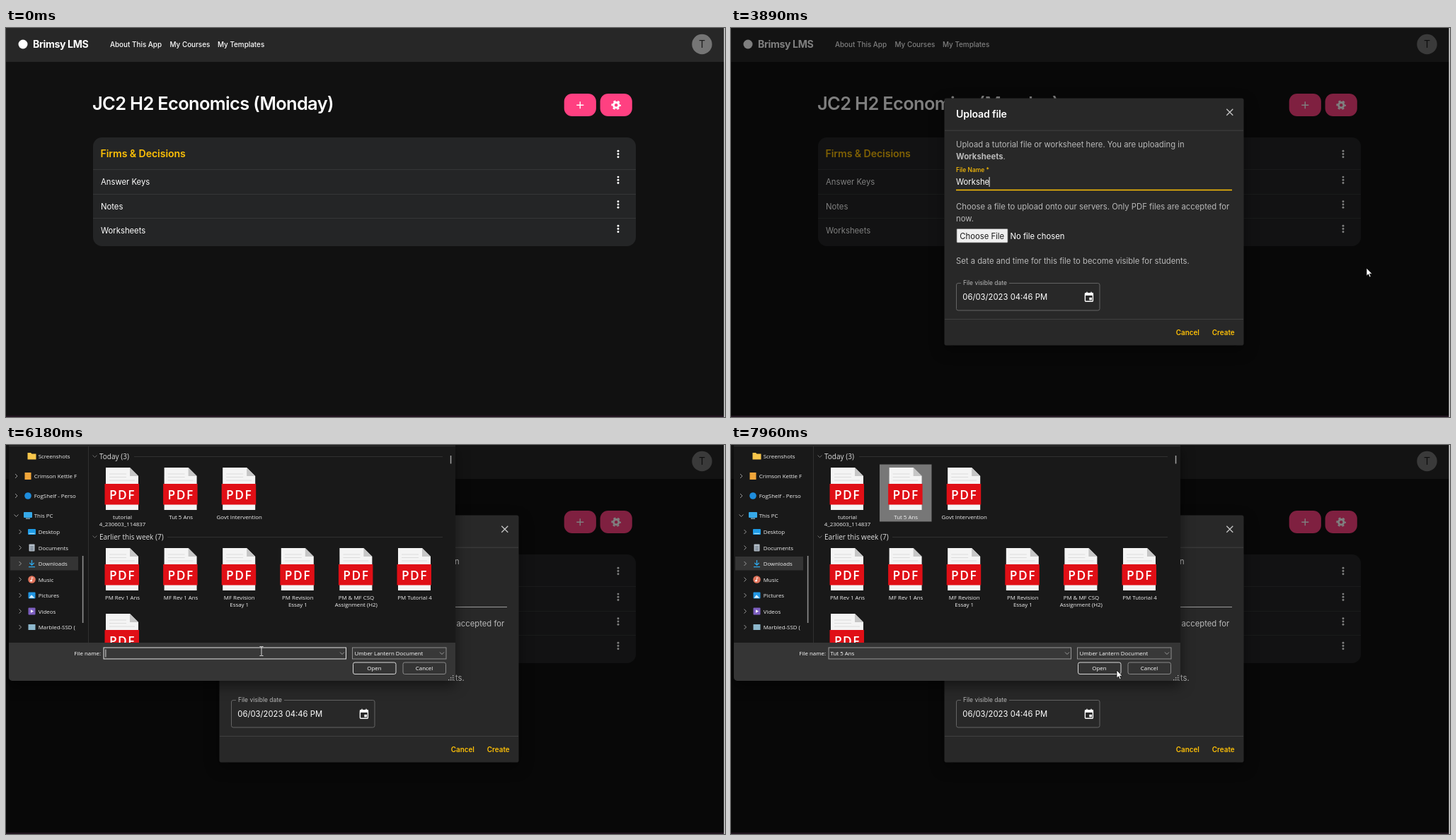
An HTML page for the animation above (8000 ms loop, 1016 px wide and 551 px high).

```html
<!DOCTYPE html>
<html lang="en">
<head>
<meta charset="utf-8">
<title>Course file upload</title>
<style>
html, body { margin: 0; width: 100%; height: 100%; overflow: hidden; background: #111; }
svg { display: block; width: 100vw; height: 100vh; }
text { font-family: Inter, sans-serif; font-optical-sizing: none; white-space: pre; }
#dialog { filter: drop-shadow(0 7px 9px rgba(0,0,0,.5)); }
#dialog text { font-family: "Open Sans", sans-serif; }
</style>
</head>
<body>
<svg id="stage" viewBox="0 0 1016 551"></svg>
<script>
const AMBER = "#ffc107", PINK = "#ff4081", SOFT = "#b9b9b9";
const stage = document.getElementById("stage");

// Markup helpers
const text = (s, x, y, size = 11.29, fill = "#fff", extra = "") =>
  `<text x="${x}" y="${y}" font-size="${size}" fill="${fill}" ${extra}>${s}</text>`;
const rect = (x, y, w, h, fill, extra = "") =>
  `<rect x="${x}" y="${y}" width="${w}" height="${h}" fill="${fill}" ${extra}/>`;
const circle = (x, y, r, fill, extra = "") =>
  `<circle cx="${x}" cy="${y}" r="${r}" fill="${fill}" ${extra}/>`;
const line = (d, color, width = 1, extra = "") =>
  `<path d="${d}" fill="none" stroke="${color}" stroke-width="${width}" ${extra}/>`;
const shape = (d, fill, extra = "") => `<path d="${d}" fill="${fill}" ${extra}/>`;
const group = (id, content) => `<g id="${id}">${content}</g>`;
const weight = (w, spacing = 0) => `font-weight="${w}" letter-spacing="${spacing}em"`;
const MIDDLE = 'text-anchor="middle"';

const dots = y => [-4.2, 0, 4.2].map(d => circle(865, y + d, 1.45, "#fff")).join("");
const plus = (x, y, r, color, w) => line(`M${x - r} ${y}h${2 * r}M${x} ${y - r}v${2 * r}`, color, w);

const page = () => `
  ${rect(0, 0, 1016, 551, "#111")}
  ${rect(0, 0, 1016, 48, "#272727")}
  ${circle(24, 23, 6.5, "#fff")}
  ${text("Brimsy LMS", 38, 28, 14.11, "#fff", weight(700, -.025))}
  ${text("About This App", 147, 27, 9.88, "#fff", weight(500))}
  ${text("My Courses", 231.5, 27, 9.88, "#fff", weight(500))}
  ${text("My Templates", 299, 27, 9.88, "#fff", weight(500))}
  ${circle(983.5, 23, 14.2, "#757575")}
  ${text("T", 983.5, 28, 14.11, "#1c1c1c", MIDDLE)}
  ${text("JC2 H2 Economics (Monday)", 122, 116, 25.4, "#fff", weight(600, -.025))}
  ${rect(788.7, 93, 45.2, 32, PINK, 'rx="11.3"')}${rect(839.6, 93, 45.2, 32, PINK, 'rx="11.3"')}
  ${plus(811.3, 109.2, 5, "#fff", 1.4)}
  ${circle(862.2, 109.2, 3.7, "none", 'stroke="#fff" stroke-width="2.8"')}
  ${circle(862.2, 109.2, 5.8, "none", 'stroke="#fff" stroke-width="2" stroke-dasharray="3.1 2.97" stroke-dashoffset="1.55"')}
  ${rect(123, 155, 767, 154, "#242526", 'rx="12.5"')}
  ${line("M123 200.5H890M123 235.5H890M123 269.5H890", "#353637")}
  ${text("Firms &amp; Decisions", 133.5, 182.5, 14.11, AMBER, weight(600, -.005))}
  ${text("Answer Keys", 134, 222)}${text("Notes", 134, 256.7)}${text("Worksheets", 134, 291.2)}
  ${circle(865, 284, 13.5, "#37383a", 'id="ripple"')}
  ${[178.5, 215.3, 250, 284.5].map(dots).join("")}`;

const menu = () => `
  ${rect(851, 304, 106, 93, "#111", 'rx="2.8"')}
  ${rect(851, 307, 106, 25.4, "#272727")}
  ${rect(851, 332.4, 106, 25.4, "#1e1e1e", 'id="createHover"')}
  ${shape("M863.5 324.2v-2.1l5.6-5.6 2.1 2.1-5.6 5.6zM869.7 316l1.1-1.1 2.1 2.1-1.1 1.1z", "#ddd")}
  ${plus(868, 345.2, 3.7, "#ddd", 1.2)}
  ${line("M851 363.5H957", "#333")}
  ${shape("M864.8 380h6.4v7h-6.4zM864.3 378h2.2l.6-.7h1.8l.6.7h2.2v1.3h-7.4z", "#d50000")}
  ${text("Edit Section", 882, 324, 11.29, "#e0e0e0")}
  ${text("Create File", 882, 349, 11.29, "#e0e0e0")}
  ${text("Delete", 882, 386.5, 11.29, "#c40000")}`;

const modal = () => `
  ${rect(0, 0, 1016, 551, "#000", 'opacity=".5"')}
  ${rect(301.5, 99.5, 423, 350, "#282828", 'rx="2.8" style="filter:drop-shadow(0 7px 10px rgba(0,0,0,.4))"')}
  ${line("M302 145.2H724M302 412.5H724", "#404040")}
  ${text("Upload file", 318, 127, 14.11, "#fff", weight(600, -.01))}
  ${line("M700.3 114.8l9 9m0-9l-9 9", "#c4c4c4", 1.3)}
  ${text("Upload a tutorial file or worksheet here. You are uploading in", 318, 169.3, 11.29, SOFT)}
  ${text("Worksheets", 318, 186.3, 11.29, SOFT, weight(700) + ' id="folderName"')}
  ${text("File Name *", 318, 204, 8.47, AMBER, weight(500) + ' id="label"')}
  ${text("", 318, 222, 11.29, "#fff", 'id="typed"')}
  ${rect(318, 211, .9, 14, "#fff", 'id="caret"')}
  ${line("M318 229.5H708", AMBER, 1.4, 'id="underline"')}
  ${text("Choose a file to upload onto our servers. Only PDF files are accepted for", 318, 257, 11.29, SOFT)}
  ${text("now.", 318, 274, 11.29, SOFT)}
  ${rect(319, 284.5, 72, 19.5, "#efefef", 'stroke="#767676" stroke-width=".7" rx="1"')}
  ${text("Choose File", 323.3, 298.5, 11.29, "#1a1a1a")}
  ${text("No file chosen", 394.5, 298.5)}
  ${text("Set a date and time for this file to become visible for students.", 318, 334.3, 11.29, SOFT)}
  ${line("M325 361.5h-4a2.5 2.5 0 0 0-2.5 2.5v33.5a2.5 2.5 0 0 0 2.5 2.5h197.5a2.5 2.5 0 0 0 2.5-2.5v-33.5a2.5 2.5 0 0 0-2.5-2.5H393", "#6b6b6b", .9)}
  ${text("File visible date", 328, 364, 8.47, SOFT)}
  ${text("06/03/2023 04:46 PM", 327.3, 384.5)}
  ${rect(500.4, 375.8, 11, 11.4, "none", 'stroke="#fff" stroke-width="1.4" rx="1"')}
  ${rect(500, 375.3, 12, 3.6, "#fff")}${rect(506.3, 381.8, 3.6, 3.6, "#fff")}
  ${line("M503 373.8v2M509 373.8v2", "#fff", 1.4)}
  ${text("Cancel", 628.7, 434.5, 9.88, AMBER, weight(600))}
  ${text("Create", 679.8, 434.5, 9.88, AMBER, weight(600))}`;

// File picker
const SMALL = 7.9;
const chevron = (x, y, down, color = "#a5a5a5") =>
  line(down ? `M${x - 3} ${y - 1.5}l3 3 3-3` : `M${x - 1.5} ${y - 3}l3 3-3 3`, color, .9);

const icons = {
  folder: (x, y) => shape(`M${x - 6} ${y - 4.5}h4.5l1.5 1.5h6v8h-12z`, "#f7c64b"),
  square: (x, y) => rect(x - 4.5, y - 5, 9, 10, "#f0a53a"),
  disc: (x, y) => circle(x, y, 4.8, "#1e8ddd"),
  screen: (x, y) => rect(x - 6, y - 5, 12, 8, "#36a9e8", 'rx="1"') + rect(x - 3, y + 3.5, 6, 1.3, "#8fb8cc"),
  desk: (x, y) => rect(x - 5.5, y - 4, 11, 8, "#1d9be6", 'rx="1"') + rect(x - 4, y + 1.8, 8, 1, "#c9ecff"),
  page: (x, y) => rect(x - 4, y - 5, 8, 10, "#b4bec8", 'rx=".7"') + line(`M${x - 2.3} ${y - 1.5}h4.6m0 2.2h-4.6m0 2.2h4.6`, "#566573", .9),
  arrow: (x, y) => line(`M${x} ${y - 5}v7m-3.2-3l3.2 3.2 3.2-3.2M${x - 4.5} ${y + 4.6}h9`, "#2ea8ea", 1.3),
  music: (x, y) => circle(x, y, 5.3, "#e0745c") + circle(x - 1, y + 1.7, 1.3, "#fff") + line(`M${x} ${y + 1.7}v-4.5l2 1`, "#fff", .8),
  photo: (x, y) => rect(x - 5, y - 4.5, 10, 9, "#2196e3", 'rx="1"') + shape(`M${x - 4} ${y + 3.7}l3.5-4.5 4.5 4.5z`, "#d8f0ff"),
  film: (x, y) => rect(x - 5, y - 5, 10, 10, "#7d5fc0", 'rx="1"') + shape(`M${x - 1.5} ${y - 2.3}l4 2.3-4 2.3z`, "#fff"),
  drive: (x, y) => rect(x - 5, y - 4, 10, 8, "#8db7cc")
};

const places = [
  ["Screenshots", 15.5, "folder", 2], ["Crimson Kettle F", 44, "square", 0], ["FogShelf - Perso", 72, "disc", 0],
  ["This PC", 100, "screen", 0], ["Desktop", 123, "desk", 1], ["Documents", 145.5, "page", 1],
  ["Downloads", 168, "arrow", 1], ["Music", 190.5, "music", 1], ["Pictures", 213, "photo", 1],
  ["Videos", 235.5, "film", 1], ["Marbled-SSD (", 258, "drive", 1]
];
const place = ([name, y, icon, depth]) =>
  (depth < 2 ? chevron(depth ? 20 : 14.5, y, name === "This PC") : "") +
  icons[icon](depth ? 36.5 : 31, y) + text(name, depth ? 45.7 : 39.7, y + 3, SMALL, "#f0f0f0");

const column = i => 164 + 82.6 * i;
const file = (lines, i, top) => {
  const x = column(i);
  return shape(`M${x - 23} ${top}h34l12 12v48h-46z`, "#f4f4f4") +
    shape(`M${x + 11} ${top}v12h12z`, "#c6c6c6") +
    line(`M${x - 18} ${top + 9}h24m-24 4.5h24m-24 4.5h36`, "#dcdcdc") +
    rect(x - 24.5, top + 23, 48.5, 29.5, "#e00f16") +
    text("PDF", x + .5, top + 44.6, 17.3, "#fff", MIDDLE + " " + weight(600, .09)) +
    lines.map((s, n) => text(s, x + .5, top + 72.5 + 10.5 * n, SMALL, "#f2f2f2", MIDDLE)).join("");
};
const today = [["tutorial", "4_230603_114837"], ["Tut 5 Ans"], ["Govt Intervention"]];
const earlier = [["PM Rev 1 Ans"], ["MF Rev 1 Ans"], ["MF Revision", "Essay 1"], ["PM Revision", "Essay 1"],
  ["PM &amp; MF CSQ", "Assignment (H2)"], ["PM Tutorial 4"]];
const heading = (s, y, lineX) => chevron(125.5, y, true, "#777") +
  text(s, 132, y + 4, 10, "#dedede") + line(`M${lineX} ${y + .5}H617`, "#303030");
const button = (s, x, border) => rect(x, 308, 60.5, 16.5, "#343434", `rx="2.5" stroke="${border}" stroke-width=".9"`) +
  text(s, x + 30, 319, SMALL, "#fff", MIDDLE);
const gripDots = [[631, 326], [628, 329], [631, 329], [625, 332], [628, 332], [631, 332]];

const dialog = () => `
  <clipPath id="sideClip"><rect width="103" height="280"/></clipPath>
  <clipPath id="listClip"><rect x="117" width="517" height="280"/></clipPath>
  ${shape("M4 0H635V329a5 5 0 0 1-5 5H9a5 5 0 0 1-5-5z", "#191919")}
  ${shape("M4 280H635V329a5 5 0 0 1-5 5H9a5 5 0 0 1-5-5z", "#353535")}
  ${line("M4 1.5H635M116.5 2V280", "#2f2f2f")}
  ${rect(6, 158, 96, 19.5, "#343434")}
  <g clip-path="url(#sideClip)">${places.map(place).join("")}</g>
  ${rect(107.8, 157, 1.6, 95, "#8e8e8e")}
  ${text("Working on it...", 376, 22.5, SMALL, "#fff", MIDDLE + ' id="working"')}
  <g id="files" clip-path="url(#listClip)">
    ${rect(117, 120, 505, 20, "#2b2b2b", 'id="headingHover"')}
    ${rect(210, 27.5, 73.5, 81, "#4d4d4d", 'id="todayHover"')}
    ${rect(210, 141, 73.5, 82, "#4d4d4d", 'id="earlierHover"')}
    ${heading("Today (3)", 16, 181)}${heading("Earlier this week (7)", 130, 228)}
    ${today.map((f, i) => file(f, i, 32)).join("")}
    ${earlier.map((f, i) => file(f, i, 146)).join("")}
    ${file([], 0, 239)}
    ${rect(627.8, 15, 1.5, 11.5, "#a0a0a0")}
  </g>
  ${text("File name:", 134, 298, SMALL, "#fff", 'text-anchor="end"')}
  ${rect(138, 287, 342.5, 16, "#383838", 'id="nameField" stroke="#e4e4e4" stroke-width="1"')}
  ${text("Tut 5 Ans", 140.5, 298, SMALL, "#fff", 'id="chosen"')}
  ${rect(140.5, 289.5, .8, 11, "#fff", 'id="nameCaret"')}
  ${chevron(475, 295, true)}
  ${rect(489.5, 287, 132.5, 16, "#383838", 'stroke="#989898" stroke-width=".9"')}
  ${text("Umber Lantern Document", 492.5, 298, SMALL, "#fff")}${chevron(616, 295, true)}
  ${button("Open", 490.5, "#ececec")}${button("Cancel", 561, "#929292")}
  ${gripDots.map(([x, y]) => rect(x, y, 1.4, 1.4, "#aaa")).join("")}`;

const cursor = () => `
  ${shape("M0 0V11.2L2.6 8.8 4.4 12.9 6.2 12.1 4.5 8.2H8z", "#fff", 'id="arrow" stroke="#000" stroke-width=".7"')}
  ${shape("M-1.4 1.3q1.4-1.8 2.8 0V6l5 1.3q1.6.5 1.5 2l-1 4.5v2.2h-6.5l-4.5-6q-.4-1.9 1.5-1.4l1.2 1z", "#fff", 'id="hand" stroke="#000" stroke-width=".7"')}
  ${line("M-2.5-6.5h2l.5.5.5-.5h2M0-6V6M-2.5 6.5h2l.5-.5.5.5h2", "#eee", .9, 'id="beam"')}`;

stage.innerHTML = page() + group("menu", menu()) + group("modal", modal()) + group("dialog", dialog()) +
  rect(0, 549, 1016, 2, "#21141f") + rect(1014.5, 0, 1.5, 551, "#d8d8d8") + group("cursor", cursor());
const el = {};
stage.querySelectorAll("[id]").forEach(node => el[node.id] = node);
el.folderName.insertAdjacentHTML("beforeend", '<tspan font-weight="400">.</tspan>');

// Timing
const LOOP = 8000, BLUR = 5400, PICK = 7400;
const FILE_NAME = "Worksheet 5";
const keyTimes = [2620, 3020, 3160, 3420, 3560, 3750, 3890, 4040, 4170, 4370, 4510];
const route = [
  [70, 971, 552], [740, 865, 285.5], [1060, 865, 285.5], [1340, 898, 340], [4680, 898, 340],
  [5440, 361, 292], [6500, 361, 292], [6640, 254, 145], [6960, 244, 78], [7340, 247, 62],
  [7430, 247, 62], [7960, 545, 319]
];
const clamp = v => Math.min(1, Math.max(0, v));
const ramp = (t, from, to) => clamp((t - from) / (to - from));
const easeOut = p => 1 - (1 - p) ** 3;
const smooth = p => p * p * (3 - 2 * p);
const show = (node, on) => node.setAttribute("visibility", on ? "inherit" : "hidden");
const blink = (t, since) => (t - since + LOOP) % 1000 < 500;

function position(t) {
  if (t < route[0][0]) return [971, 570];
  const next = route.findIndex(stop => stop[0] > t);
  if (next < 0) return route[route.length - 1].slice(1);
  const [t0, x0, y0] = route[next - 1], [t1, x1, y1] = route[next];
  const p = smooth(ramp(t, t0, t1));
  return [x0 + (x1 - x0) * p, y0 + (y1 - y0) * p];
}

function drawPage(t) {
  const opened = easeOut(ramp(t, 940, 1180)) * (1 - ramp(t, 1560, 1720));
  el.menu.setAttribute("opacity", opened);
  el.ripple.setAttribute("opacity", opened);
  show(el.createHover, t > 1310);
}

function drawModal(t) {
  el.modal.setAttribute("opacity", easeOut(ramp(t, 1660, 1960)));
  const count = keyTimes.filter(k => k <= t).length;
  el.typed.textContent = FILE_NAME.slice(0, count);
  el.caret.setAttribute("x", 318 + (count ? el.typed.getComputedTextLength() - .5 : 0));
  const focused = t < BLUR;
  show(el.caret, focused && blink(t, count ? keyTimes[count - 1] : 1790));
  el.label.setAttribute("fill", focused ? AMBER : SOFT);
  el.underline.setAttribute("stroke", focused ? AMBER : SOFT);
  el.underline.setAttribute("stroke-width", focused ? 1.4 : .8);
}

function drawDialog(t, x, y) {
  const p = ramp(t, 5680, 5900), scale = 1 - .06 * (1 - p) ** 1.2;
  const loaded = t >= 6150, picked = t >= PICK;
  show(el.dialog, t >= 5690);
  el.dialog.setAttribute("opacity", clamp(p * 1.6));
  el.dialog.setAttribute("transform", `translate(162 59) scale(${scale}) translate(-162 -59)`);
  show(el.working, !loaded);
  show(el.files, loaded);
  const inColumn = x > 210 && x < 284;
  show(el.headingHover, loaded && y > 120 && y < 140);
  show(el.earlierHover, loaded && inColumn && y > 141 && y < 223);
  show(el.todayHover, loaded && (picked || inColumn && y < 108));
  el.todayHover.setAttribute("fill", picked ? "#777" : "#4d4d4d");
  show(el.chosen, picked);
  show(el.nameCaret, !picked && blink(t, 5800));
  el.nameField.setAttribute("stroke", picked ? "#989898" : "#e4e4e4");
}

function drawCursor(t, x, y) {
  el.cursor.setAttribute("transform", `translate(${x} ${y})`);
  const hand = t > 690 && t < 1640;
  const beam = t > 5740 && y > 287 && y < 303 && x > 138 && x < 480;
  show(el.hand, hand);
  show(el.beam, beam);
  show(el.arrow, !hand && !beam);
}

function frame(now) {
  const t = now % LOOP, [x, y] = position(t);
  drawPage(t);
  drawModal(t);
  drawDialog(t, x, y);
  drawCursor(t, x, y);
  requestAnimationFrame(frame);
}
requestAnimationFrame(frame);
</script>
</body>
</html>
```
